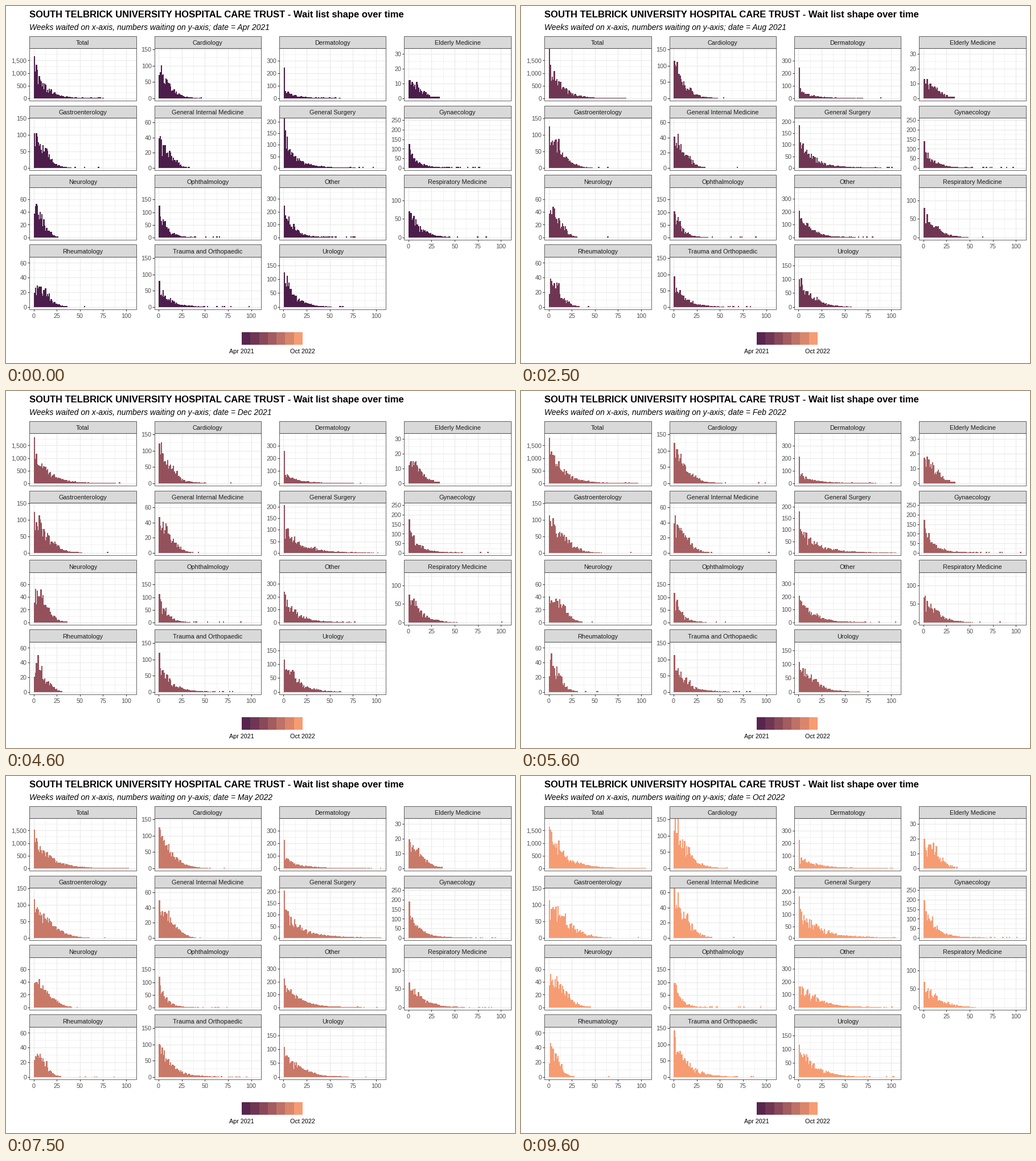
A matplotlib script that plays this animation: 894x626 px, repeating every 10 s.

```python
import numpy as np
import matplotlib.pyplot as plt
from matplotlib.animation import FuncAnimation
from matplotlib.collections import LineCollection, PolyCollection
from matplotlib.patches import Rectangle

W, H, DPI = 894, 626, 64
PT = 72 / DPI  # points per pixel
plt.rcParams["font.family"] = "Liberation Sans"

fig = plt.figure(figsize=(W / DPI, H / DPI), dpi=DPI, facecolor="white")
ax = fig.add_axes([0, 0, 1, 1])
ax.set(xlim=(0, W), ylim=(H, 0))
ax.axis("off")

# Panel geometry in pixels
LEFT, PITCH_X, PANEL_W = 41.2, 219.4, 187.4
BOTTOM, PITCH_Y, PANEL_H, STRIP_H = 166.2, 121.9, 92.1, 21.5
X0, WEEK, PAD = 7.4, 1.625, 4.2

MONTHS = "Jan Feb Mar Apr May Jun Jul Aug Sep Oct Nov Dec".split()
N_MONTHS = 19
STARTS = [0, 7, 13, 19, 25, 31] + list(range(36, 100, 5))
WEEKS = np.arange(1, 106)
DARK, GREY = "#333333", "#4D4D4D"


def text(x, y, s, px, **kw):
    return ax.text(x, y, s, fontsize=px * PT, va="baseline", zorder=5, **kw)


def shade(t):
    low, high = np.array([76, 29, 75]), np.array([246, 156, 115])
    sag = np.array([16, 18, 4])
    return (low + t * (high - low) - sag * t * (1 - t)) / 255


major, minor, ticks = [], [], []
heights, origins = [], []


def queue(level, reach, bend, spike, tail, speck, seed):
    """Bar heights per month: a decaying queue whose cohorts age four weeks a month."""
    rng = np.random.default_rng(seed)
    intake = np.clip(rng.normal(1, 0.18, WEEKS.size + 4 * N_MONTHS), 0.5, 1.5)
    out = []
    for m in range(N_MONTHS):
        t = m / (N_MONTHS - 1)
        size, span = (a + (b - a) * t for a, b in (level, reach))
        jitter = np.clip(rng.normal(1, 0.1, WEEKS.size), 0.7, 1.3)
        bars = size * np.exp(-(WEEKS / span) ** bend) * jitter
        bars *= intake[WEEKS - 1 + 4 * (N_MONTHS - 1 - m)]
        bars[0] = size * spike * jitter[0]
        bars = np.round(bars)
        rare = rng.random(WEEKS.size) < tail * np.exp((32 - WEEKS) / 28)
        out.append(np.where(rare & (WEEKS > 32), np.maximum(bars, speck), bars))
    return np.array(out)


def panel(name, top, step, level, reach, bend, spike, tail):
    i = len(heights)
    r, c = divmod(i, 4)
    left, bottom = LEFT + PITCH_X * c, BOTTOM + PITCH_Y * r
    right, upper = left + PANEL_W, bottom - PANEL_H
    zero, scale = bottom - PAD, (PANEL_H - 2 * PAD) / top

    for y, h, fill, z in ((upper - STRIP_H, STRIP_H, "#D9D9D9", 4), (upper, PANEL_H, "none", 3)):
        ax.add_patch(Rectangle((left, y), PANEL_W, h, fc=fill, ec=DARK, lw=0.75 * PT, zorder=z))
    text((left + right) / 2, upper - 6.2, name, 10.95, ha="center", color="#1A1A1A")

    half = step / 2 * scale
    for k in range(int((zero - upper) / half) + 1):
        y = zero - k * half
        (minor if k % 2 else major).append([(left, y), (right, y)])
        if k % 2 == 0:
            ticks.append([(left - 3.2, y), (left, y)])
            text(left - 5, y + 4.1, f"{k * step // 2:,}", 10.8, ha="right", color=GREY)

    for k in range(9):
        x = left + X0 + 12.5 * k * WEEK
        (minor if k % 2 else major).append([(x, upper), (x, bottom)])
        if k % 2 == 0 and i >= 11:
            ticks.append([(x, bottom), (x, bottom + 3.2)])
            text(x, bottom + 15.4, str(25 * k // 2), 10.8, ha="center", color=GREY)

    heights.append(scale * queue(level, reach, bend, spike, tail, 1.1 / scale, i + 11))
    origins.append((left + X0, zero))


# name, axis top, tick step, then level and reach (first, last month), bend, spike, tail
panel("Total", 1883, 500, (1250, 1300), (12, 18), 1.05, 1.25, 0.15)
panel("Cardiology", 146, 50, (80, 120), (14, 17), 1.4, 1.15, 0.1)
panel("Dermatology", 380, 100, (75, 85), (10, 16), 0.9, 2.8, 0.15)
panel("Elderly Medicine", 32.2, 10, (11, 18), (17, 18), 1.8, 1.1, 0)
panel("Gastroenterology", 145, 50, (88, 82), (16, 27), 1.8, 1.35, 0.1)
panel("General Internal Medicine", 63, 20, (30, 40), (16, 20), 2, 1.3, 0.03)
panel("General Surgery", 206, 50, (140, 130), (11, 18), 0.9, 1.35, 0.5)
panel("Gynaecology", 250, 50, (100, 150), (9, 12), 1, 1.3, 0.7)
panel("Neurology", 75, 20, (40, 42), (14, 23), 2.2, 0.9, 0.02)
panel("Ophthalmology", 189, 50, (110, 85), (9, 9), 1.2, 1.25, 0.2)
panel("Other", 372, 100, (180, 150), (12, 22), 1.2, 1.3, 0.6)
panel("Respiratory Medicine", 129, 50, (60, 48), (15, 19), 1.4, 1.3, 0.2)
panel("Rheumatology", 65, 20, (30, 38), (18, 13), 2, 0.6, 0.04)
panel("Trauma and Orthopaedic", 147, 50, (60, 110), (12, 15), 1.1, 1.25, 0.6)
panel("Urology", 172, 50, (85, 82), (15, 21), 1.3, 1.35, 0.3)

for lines, color, width, z in ((minor, "#EBEBEB", 0.6, 1), (major, "#EBEBEB", 1.2, 1),
                               (ticks, DARK, 1, 3)):
    ax.add_collection(LineCollection(lines, colors=color, linewidths=width * PT, zorder=z),
                      autolim=False)

text(41, 20.3, "SOUTH TELBRICK UNIVERSITY HOSPITAL CARE TRUST - Wait list shape over time",
     16.68, weight="bold", color="black")
subtitle = text(41, 42.2, "", 13.85, style="italic", color="black")

# Legend steps
STEP_W = 107 / 7
for k in range(7):
    ax.add_patch(Rectangle((414 + k * STEP_W, 572.3), STEP_W, 21.5, lw=0,
                           fc=shade(0.07 + 0.155 * k)))
text(413.7, 609, "Apr 2021", 10.8, ha="center", color="black")
text(521, 609, "Oct 2022", 10.8, ha="center", color="black")

bars = PolyCollection([], linewidths=0, antialiaseds=False, zorder=2)
bars.set_snap(False)
ax.add_collection(bars, autolim=False)


def position(i):
    """Month shown at step i, with a halfway step before each change."""
    m = sum(s <= i for s in STARTS) - 1
    return m, 0.5 if i + 1 in STARTS else 0


def draw(i):
    m, part = position(i)
    after = min(m + 1, N_MONTHS - 1)
    verts = []
    for (x0, zero), table in zip(origins, heights):
        h = (1 - part) * table[m] + part * table[after]
        for w in np.flatnonzero(h > 0.05):
            x = x0 + (WEEKS[w] - 0.45) * WEEK
            x2, y = x + 0.9 * WEEK, zero - h[w]
            verts.append([(x, zero), (x, y), (x2, y), (x2, zero)])
    bars.set_verts(verts)
    bars.set_facecolor(shade((m + part) / (N_MONTHS - 1)))
    year, month = divmod(m + 3, 12)
    subtitle.set_text("Weeks waited on x-axis, numbers waiting on y-axis; "
                      f"date = {MONTHS[month]} {2021 + year}")
    return bars, subtitle


anim = FuncAnimation(fig, draw, frames=100, interval=100, repeat=True, repeat_delay=0,
                     init_func=lambda: draw(0), blit=False)
plt.show()
```
